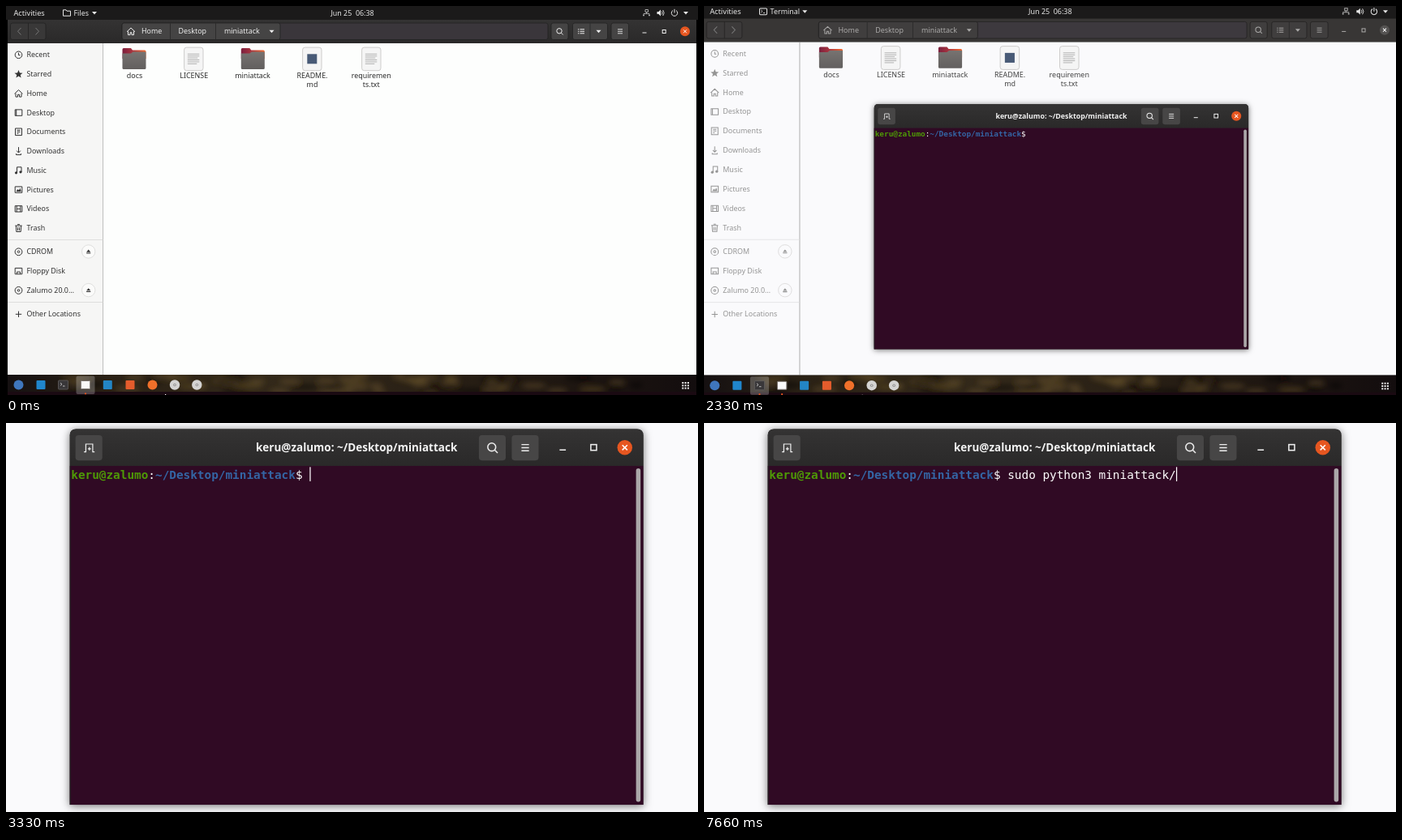
Recreate the animation shown at these times as an HTML page. Size 853 px wide and 480 px high, loop 8 s.

```html
<!DOCTYPE html>
<html lang="en">
<head>
<meta charset="utf-8">
<title>Opening a terminal</title>
<style>
  html, body { margin: 0; width: 100%; height: 100%; overflow: hidden; background: #000; }
  svg { display: block; width: 100vw; height: 100vh; }
  text { font: 8.9px "Noto Sans", "Open Sans", sans-serif; white-space: pre; }
  .title { font-weight: 700; font-size: 8.76px; }
  .mono { font: 9.33px "DejaVu Sans Mono", "Liberation Mono", monospace; }
  .mono .b { font-weight: 700; }
  .shadow { filter: drop-shadow(0 1px 3.5px rgba(0, 0, 0, .55)); }
</style>
</head>
<body>
<svg id="stage" viewBox="0 0 853 480" preserveAspectRatio="none"></svg>
<script>
const LOOP = 8000, STEPS_PER_SECOND = 3;
const USER = 'keru@zalumo', FOLDER = '~/Desktop/miniattack';
const COMMAND = 'sudo python3 miniattack/';
const TYPING_START = 12;
const TYPED = [1, 3, 4, 5, 7, 11, 11, 12, 13, 15, 15, 24];
const CURSOR_OFF = [6, 7, 11, 18, 22];
const CHAR = 5.617;
const ORANGE = '#e65620';

const rect = (x, y, w, h, fill, extra = '') =>
  `<rect x="${x}" y="${y}" width="${w}" height="${h}" fill="${fill}" ${extra}/>`;
const circle = (x, y, r, fill, extra = '') =>
  `<circle cx="${x}" cy="${y}" r="${r}" fill="${fill}" ${extra}/>`;
const text = (x, y, str, fill, extra = '') =>
  `<text x="${x}" y="${y}" fill="${fill}" ${extra}>${str}</text>`;
const line = (d, color, width = 1, fill = 'none') =>
  `<path d="${d}" fill="${fill}" stroke="${color}" stroke-width="${width}"/>`;
const at = (x, y, body, extra = '') => `<g transform="translate(${x} ${y})" ${extra}>${body}</g>`;
const caret = (x, y, color) => at(x, y, `<path d="M-3-1.5H3L0 2Z" fill="${color}"/>`);
const middle = 'text-anchor="middle"';

const DEFS = `<defs>
  <linearGradient id="header" x2="0" y2="1"><stop stop-color="#343333"/><stop offset="1" stop-color="#2a2929"/></linearGradient>
  <linearGradient id="folder"><stop stop-color="#7b1f3e"/><stop offset=".4" stop-color="#a5333f"/><stop offset="1" stop-color="#f0692f"/></linearGradient>
  <linearGradient id="front" x2="0" y2="1"><stop stop-color="#777371"/><stop offset="1" stop-color="#625f5e"/></linearGradient>
  <linearGradient id="dock"><stop stop-color="#151011"/><stop offset=".14" stop-color="#2a2115"/><stop offset=".4" stop-color="#33291a"/>
    <stop offset=".7" stop-color="#251c13"/><stop offset="1" stop-color="#130d0e"/></linearGradient>
  <clipPath id="dockClip"><rect x="2" y="455" width="849" height="21"/></clipPath>
  <filter id="soft"><feGaussianBlur stdDeviation="3"/></filter>
</defs>`;

const clock = c => circle(0, 0, 4.3, 'none', `stroke="${c}"`) + line('M0-2.6V.4H2', c);
const disc = c => circle(0, 0, 4.4, 'none', `stroke="${c}"`) + circle(0, 0, 1.3, 'none', `stroke="${c}"`);
const home = c => line('M-5 .5L0-4.3L5 .5M-3.5 0V4.3H-1V1.5H1V4.3H3.5V0', c);
const frame = 'M-4.3-3.7H4.3V3.7H-4.3Z';
const PLACES = [
  ['Recent', 60, clock],
  ['Starred', 83.8, c => `<path d="M0-5L1.4-1.5L5-1.3L2.2 1L3.1 4.5L0 2.5L-3.1 4.5L-2.2 1L-5-1.3L-1.4-1.5Z" fill="${c}"/>`],
  ['Home', 107.5, home],
  ['Desktop', 131.3, c => line(frame + 'M-2.8-3.7V3.7', c)],
  ['Documents', 155, c => line('M-4-4.3H4V4.3H-4ZM-2-2H2M-2 0H2M-2 2H0', c)],
  ['Downloads', 178.8, c => line('M0-5V1.5M-2.3-.5L0 2L2.3-.5M-3 3V4.5H3V3', c)],
  ['Music', 202.5, c => line('M-2 3V-4H3.5V2', c) + circle(-3, 3, 1.6, c) + circle(2.5, 2, 1.6, c)],
  ['Pictures', 226.3, c => line(frame, c) + `<path d="M-3 2.5L-1-.5L.5 1L2-2L3.2 2.5Z" fill="${c}"/>`],
  ['Videos', 250, c => line(frame + 'M-2.3-3.7V3.7M2.3-3.7V3.7M-2.3 0H2.3', c)],
  ['Trash', 273.8, c => line('M-4.2-3H4.2M-3.2-3L-2.7 4.4H2.7L3.2-3M-1.5-4.5H1.5M-1-1V3M1-1V3', c)],
  ['CDROM', 303, disc, true],
  ['Floppy Disk', 326.8, c => line(frame + 'M-2 3.7V1H2V3.7', c)],
  ['Zalumo 20.0…', 350.6, disc, true],
  ['Other Locations', 380, c => line('M-3.7 0H3.7M0-3.7V3.7', c)],
];

const searchIcon = c => circle(-.5, -.5, 3.2, 'none', `stroke="${c}"`) + line('M2 2L4.2 4.2', c);
const menuIcon = c => line('M-3-2.5H3M-3 0H3M-3 2.5H3', c, .9);
const closeIcon = (fill) => circle(0, 0, 6, fill) + line('M-2-2L2 2M2-2L-2 2', '#fff');
const promptIcon = c => rect(-4.5, -3.8, 9, 7.6, 'none', `rx="1" stroke="${c}"`) + line('M-2.7-1.8L-1-.3L-2.7 1.2M0 1.7H2.2', c, .8);

function topBar(terminalOpen) {
  const c = '#e6e6e6';
  const icon = terminalOpen ? promptIcon(c) : line('M-4.5 3.7V-3.7H-1L0-2.3H4.5V3.7Z', c);
  return rect(0, 0, 853, 17, '#1b1a1a') +
    text(9.5, 11.6, 'Activities', c, 'style="font-size:9.2px"') + at(75, 8.5, icon) +
    text(83.5, 11.6, terminalOpen ? 'Terminal' : 'Files', c) + caret(terminalOpen ? 126 : 109, 8.5, c) +
    text(427, 11.6, 'Jun 25  06:38', c, middle) +
    at(789.5, 8.5, line('M-1.5-4H2V-1H-1.5ZM0-1V1M-3.5 4V1H3.5V4M-4.5 3H-2.5M2.5 3H4.5', '#aaa')) +
    at(807, 8.5, `<path d="M-4.5-1.5H-2.5L0-4V4L-2.5 1.5H-4.5Z" fill="${c}"/>` + line('M1.3-2Q3 0 1.3 2M2.8-3.5Q5.5 0 2.8 3.5', c, .9)) +
    at(824, 8.5, line('M-2-3A3.7 3.7 0 1 0 2-3M0-4.7V0', c)) + caret(838, 8.5, c);
}

function filesHeader(faded) {
  const c = faded ? '#aaa9a8' : '#eee', button = faded ? '#403e3e' : '#454444';
  const edge = 'stroke="#232222" stroke-width=".8"';
  const box = (x, w) => rect(x, 21, w, 20.5, button, `rx="2.5" ${edge}`);
  return rect(2, 17, 849, 29, faded ? '#383635' : 'url(#header)') +
    rect(5.5, 21, 43.5, 20.5, faded ? '#3c3a3a' : '#393838', `rx="2.5" ${edge}`) +
    line('M27.5 21V41.5', '#232222', .8) + line('M18.5 27L14.5 31.2L18.5 35.5M36.5 27L40.5 31.2L36.5 35.5', '#777') +
    rect(143, 21, 525, 20.5, faded ? '#3d393e' : '#3a363b', `rx="2.5" ${edge}`) +
    box(143, 195) + line('M202.5 21V41.5M258.5 21V41.5', '#2d2c2c') +
    at(154, 31.3, home(c)) + text(167, 34.4, 'Home', c) + text(212.5, 34.4, 'Desktop', c) +
    text(269, 34.4, 'miniattack', c) + caret(327.5, 31.3, c) +
    box(672, 21) + at(682.5, 31.3, searchIcon(c)) +
    box(698.5, 43) + line('M720 21V41.5', '#2d2c2c') +
    at(709, 31.3, line('M-1.5-2.5H4M-1.5 0H4M-1.5 2.5H4M-4-2.5H-2.7M-4 0H-2.7M-4 2.5H-2.7', c)) + caret(730.5, 31.3, c) +
    box(746, 21.5) + at(757, 31.3, menuIcon(c)) +
    line('M784.5 33H789.5', c) + rect(809.2, 29.5, 4, 4, 'none', `stroke="${c}"`) +
    at(837, 31.3, closeIcon(faded ? '#555352' : ORANGE));
}

function sidebar(faded) {
  const c = faded ? '#959595' : '#333';
  const rows = PLACES.map(([name, y, icon, ejectable]) =>
    at(15.5, y + .3, icon(c)) + text(25.5, y + 3.2, name, c) +
    (ejectable ? at(101.7, y, circle(0, 0, 8.2, faded ? '#fafafc' : '#fbfbfa', 'stroke="#d9d8d7" stroke-width=".8"') +
      `<path d="M-2.6.7L0-2.4L2.6.7ZM-2.6 1.4H2.6V2.5H-2.6Z" fill="${c}"/>`) : '')).join('');
  return rect(2, 46, 117.5, 409, faded ? '#fafafc' : '#f6f6f5') +
    line('M119.6 46V455M2 288.5H119.5M2 365.5H119.5', faded ? '#e2e2e3' : '#d9d8d7', .8) + rows;
}

const folderIcon = x => at(x, 65,
  '<path d="M-14.5-11.5Q-14.5-13-13-13H-4L-2-10.5H13Q14.5-10.5 14.5-9V0H-14.5Z" fill="url(#folder)"/>' +
  '<path d="M-14.5-6.5H-4L-1.5-8.5H14.5V11.5Q14.5 13 13 13H-13Q-14.5 13-14.5 11.5Z" fill="url(#front)"/>');
const pageIcon = (x, body) => at(x, 65.3, rect(-11.7, -14.2, 23.4, 28.6, '#f5f5f5', 'rx="3" stroke="#c9c8c7" stroke-width=".9"') + body);
const textLines = line('M-7.5-6H7M-7.5-3.6H7M-7.5-1.2H5M-7.5 1.2H7M-7.5 3.6H7M-7.5 6H4', '#a9a9a9', .9);

function fileGrid(faded) {
  const c = faded ? '#434343' : '#2c2c2c';
  const label = (x, ...rows) => rows.map((r, i) => text(x, 89.2 + i * 10.6, r, c, middle)).join('');
  return rect(119.9, 46, 731.1, 409, faded ? '#fafafc' : '#fdfefd') +
    folderIcon(158) + label(158.5, 'docs') +
    pageIcon(231.3, textLines) + label(231.7, 'LICENSE') +
    folderIcon(304.3) + label(304, 'miniattack') +
    pageIcon(377.3, rect(-6, -6, 12, 12, '#485a76')) + label(377.5, 'README.', 'md') +
    pageIcon(450.3, textLines) + label(450.3, 'requiremen', 'ts.txt');
}

function contextMenu(hovered) {
  const row = (y, name, key, c = '#333') =>
    text(263, y, name, c) + text(441, y, key, '#999', 'text-anchor="end"');
  return rect(255.5, 217.5, 192, 103, '#f8f8f7', 'stroke="#cfcecd"') +
    (hovered ? rect(256, 253, 190, 15, '#e2e1e0') : '') +
    line('M256 270.5H447M256 298.5H447', '#e2e1e0', .8) +
    row(232, 'New Folder', 'Shift+Ctrl+N') + row(248, 'Paste', 'Ctrl+V', '#999') +
    row(263.7, 'Open in Terminal', '') + row(286, 'Select All', 'Ctrl+A') + row(312, 'Properties', 'Ctrl+I');
}

function dockTexture() {
  let body = '';
  const rand = n => { const v = Math.sin(n * 91.7) * 43758.5; return v - Math.floor(v); };
  for (let i = 0; i < 60; i++) {
    const color = i % 3 ? '#6a532a' : '#0d0909';
    body += `<ellipse cx="${80 + rand(i) * 700}" cy="${455 + rand(i + 80) * 22}" rx="${6 + rand(i + 160) * 13}" ry="4" fill="${color}" opacity=".42"/>`;
  }
  return rect(2, 455, 849, 25, 'url(#dock)') +
    `<g clip-path="url(#dockClip)"><g filter="url(#soft)">${body}</g></g>` + rect(2, 476, 849, 4, '#1a0a12');
}
const TEXTURE = dockTexture();

function dock(terminalOpen) {
  const y = 467.5, square = (x, fill) => rect(x - 5.5, y - 5.5, 11, 11, fill, 'rx="1"');
  const disk = x => circle(x, y, 6.2, '#d4d3d2') + circle(x, y, 1.8, '#8f8e8e') + circle(x, y, .8, '#eee');
  let dots = '';
  for (let i = 0; i < 9; i++) dots += rect(833.3 + i % 3 * 3.3, 464 + Math.floor(i / 3) * 3.3, 2, 2, '#eee');
  return TEXTURE + rect(terminalOpen ? 59 : 86.5, 456.5, 23, 22.5, '#fff', 'rx="2" opacity=".24"') +
    circle(15.5, y, 6, '#3f76bd') + square(43, '#2086cc') +
    rect(64.5, y - 5.5, 12, 11, '#393739', 'rx="1" stroke="#676566" stroke-width=".7"') + line('M67 465L69 466.7L67 468.4M70 469H72.5', '#ddd', .8) +
    rect(92.3, y - 5, 11.4, 10, '#fafafa', 'rx="1" stroke="#77706b"') +
    square(125.3, '#2385c5') + square(153, '#e45c2c') + circle(180.5, y, 6, '#f0702a') +
    disk(208) + disk(235.3) + circle(98, 478.3, 1.1, ORANGE) +
    (terminalOpen ? circle(70.5, 478.3, 1.1, ORANGE) : '') + rect(196, 479, 1.2, 1, '#fff') + dots;
}

function terminal(step) {
  const typed = step < TYPING_START ? 0 : TYPED[step - TYPING_START];
  const button = x => rect(x, 4.8, 21.5, 20.3, '#474646', 'rx="2.5"');
  const c = '#eee';
  const prompt = `<tspan class="b" fill="#4e9a06">${USER}</tspan>:<tspan class="b" fill="#3465a4">${FOLDER}</tspan>$ `;
  return '<path class="shadow" d="M0 301V5Q0 0 5 0H454Q459 0 459 5V301Z" fill="#2d2c2c"/>' +
    '<path d="M0 29.5V5Q0 0 5 0H454Q459 0 459 5V29.5Z" fill="url(#header)"/>' +
    rect(0, 29.5, 459, 271.5, '#300a24') + rect(0, 29.5, .7, 271.5, '#241f22') +
    button(4.5) + at(15.3, 15, line('M-4 3.3H-2.5V-3H3V3.3H4.5M-.9 .8H1.6M.35-.5V2', c, .8)) +
    text(229.5, 17.8, `${USER}: ${FOLDER}`, '#f2f2f2', `class="title" ${middle}`) +
    button(327.4) + at(338.2, 14.9, searchIcon(c)) + button(353.7) + at(364.5, 14.9, menuIcon(c)) +
    line('M392 16.7H397', c) + rect(417, 12.4, 4.6, 4.6, 'none', `stroke="${c}"`) +
    at(444.2, 14.8, closeIcon(ORANGE), 'class="close"') +
    rect(453.2, 31.5, 3.6, 267.2, '#aba7a9', 'rx="1.8"') +
    text(1, 39.7, prompt + COMMAND.slice(0, typed), '#fff', 'class="mono"') +
    (CURSOR_OFF.includes(step) ? '' : rect(1 + (34 + typed) * CHAR, 30.4, .8, 11.4, '#fff'));
}

function zoomAt(step) {
  const u = Math.min(1, Math.max(0, step / STEPS_PER_SECOND - 2.264));
  return 1 + .54 * (u < .5 ? 2 * u * u : 1 - 2 * (1 - u) ** 2);
}

function scene(step) {
  const open = step >= 5, zoom = zoomAt(step);
  const [x, y] = step >= 7 ? [211, 122] : [32.7, 47.8];
  return DEFS + `<g transform="translate(456 334) scale(${zoom}) translate(-456 -334)">` +
    rect(0, 0, 853, 480, '#000') + topBar(open) + filesHeader(open) + fileGrid(open) + sidebar(open) + dock(open) +
    (step === 2 || step === 3 ? contextMenu(step === 3) : '') +
    (open ? at(x, y, terminal(step)) : '') + '</g>';
}

const stage = document.getElementById('stage');
const start = performance.now();
let shown = -1;
function tick() {
  const t = (performance.now() - start) % LOOP;
  const step = Math.min(23, Math.floor((t + 7) * STEPS_PER_SECOND / 1000));
  if (step !== shown) stage.innerHTML = scene(shown = step);
  requestAnimationFrame(tick);
}
tick();
</script>
</body>
</html>
```
